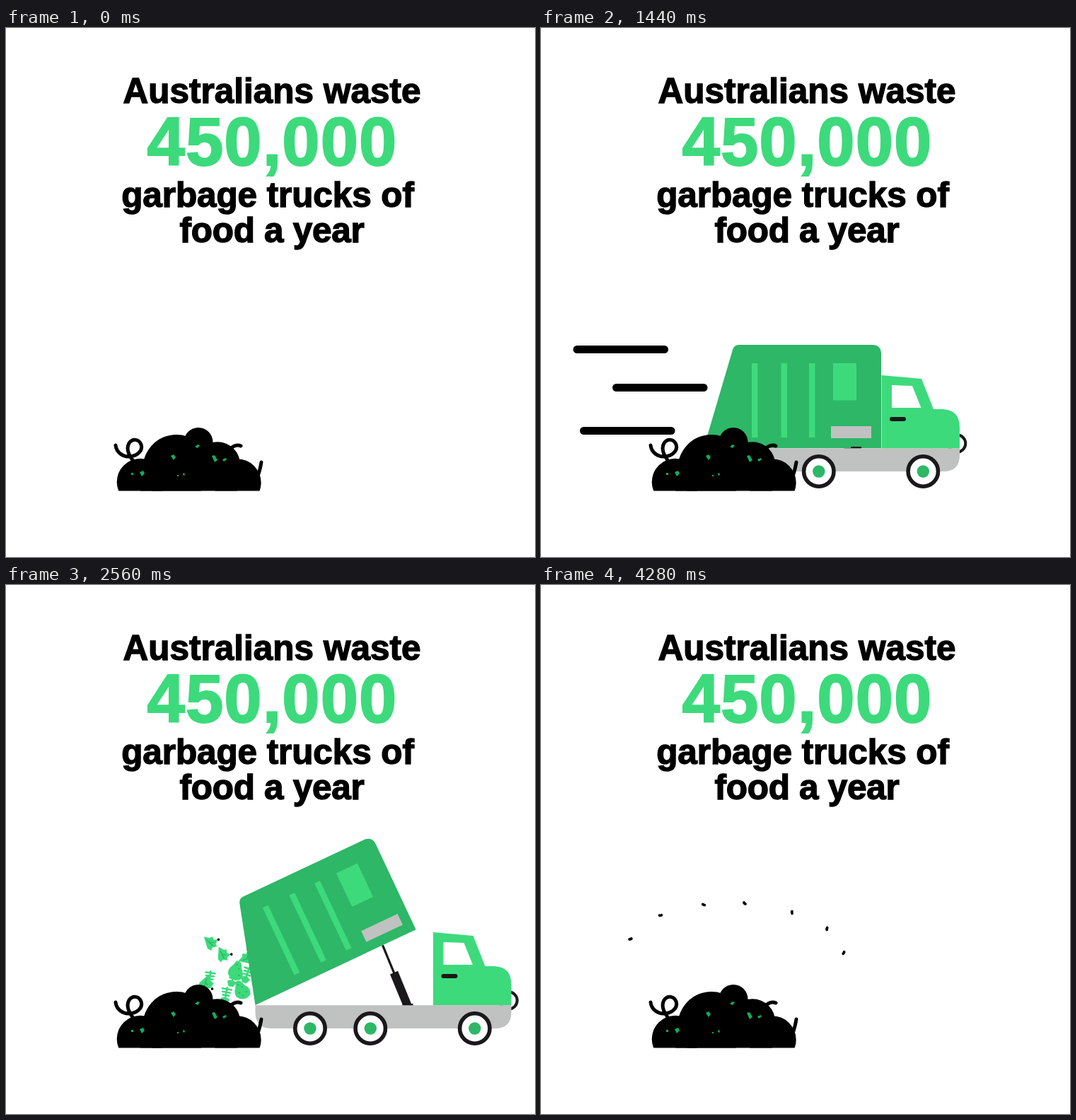
An HTML page that plays this animation: 748 by 748 pixels, repeating every 4.32 s.

```html
<!DOCTYPE html>
<html lang="en">
<head>
<meta charset="utf-8">
<title>Food waste</title>
<style>
  html, body { margin: 0; width: 100%; height: 100%; overflow: hidden; background: #fff; }
  svg { display: block; width: 100vw; height: 100vh; }
  text { font: bold 49.5px "Liberation Sans", Arial, sans-serif; text-anchor: middle; stroke: #000; stroke-width: 1.4; }
  .count { font-size: 96px; letter-spacing: 1px; fill: #3dda7c; stroke: #3dda7c; stroke-width: 2; }
  .light { fill: #3dda7c; }
  .dark { fill: #2db766; }
  .grey { fill: #c0c1c1; }
  .ink { fill: #1a181a; }
  .line { fill: none; stroke: #000; stroke-width: 5; stroke-linecap: round; stroke-linejoin: round; }
  .speck { fill: #12ae5b; }
</style>
</head>
<body>
<svg viewBox="0 0 748 748">
  <defs>
    <clipPath id="frame"><path d="M0 0H737V748H0Z"/></clipPath>
    <clipPath id="ground"><path d="M0 0H748V654.500H0Z"/></clipPath>
    <g id="wheel">
      <circle cy="627" r="21.2" fill="#fff" stroke="#1a181a" stroke-width="5.6"/>
      <circle cy="627" r="8.7" class="dark"/>
    </g>
    <g id="leaf">
      <path class="light" d="M-10-8L-3-7 1-9 3-5 8-6 6 0 8 3 2 5 1 9-4 7Z"/>
      <path d="M-6-4L3 3M-2-1L3-2" stroke="#2db766" stroke-width="1.3"/>
      <circle cx="9" cy="-6" r="1.6"/>
    </g>
    <g id="bone">
      <path d="M0-9V7M-6-7H6M-5-3H5M-4 1H4" fill="none" stroke="#3dda7c" stroke-width="2.4" stroke-linecap="round"/>
      <path class="light" d="M-6 6Q0 1 6 6L3 12-3 12Z"/>
    </g>
    <g id="pear">
      <path class="light" d="M-4-12Q3-14 5-5 12 2 9 9 3 15-5 11-12 7-9-1-6-5-4-12Z"/>
      <path d="M-5 3h2M1-3h2M4 5h2M-2 8h2M-3-7h2" stroke="#2db766" stroke-width="2"/>
    </g>
  </defs>

  <text x="376" y="106">Australians waste</text>
  <text class="count" x="376.500" y="193.500">450,000</text>
  <text x="370" y="252.500" letter-spacing="-.1">garbage trucks of</text>
  <text x="376" y="302.500" letter-spacing="-.3">food a year</text>

  <g clip-path="url(#frame)">
    <g id="speed"></g>
    <g id="food"></g>
    <g id="truck">
      <circle cx="695" cy="587.5" r="12.3" fill="none" stroke="#1a181a" stroke-width="4"/>
      <path id="rod" stroke="#1a181a" stroke-width="3.2"/>
      <path id="piston" stroke="#1a181a" stroke-width="12"/>
      <g id="box">
        <path class="dark" d="M337 594L378 455Q380 448 387 448H575Q588 448 588 461V594Z"/>
        <path class="light" d="M405 474h8.500v105h-8.500zM446.500 474h8.500v105h-8.500zM486 474h8.500v105h-8.500zM520 474h33v52.500h-33z"/>
        <path class="grey" d="M517 563h57v17h-57z"/>
      </g>
      <path class="ink" d="M545 592h15v3h-15z"/>
      <path class="light" d="M588.500 491L645 496 662 539H675Q699 540 699 565V594.500H588.500Z"/>
      <path fill="#fff" d="M603 505L632 506 644.500 537H603Z"/>
      <rect class="ink" x="600" y="550" width="23" height="6" rx="3"/>
      <path class="grey" d="M337 594.300H699V604Q699 627 676 627H360Q337 627 337 604Z"/>
      <use href="#wheel" x="414.500"/><use href="#wheel" x="499.800"/><use href="#wheel" x="647.300"/>
    </g>
  </g>

  <g id="vapour"></g>

  <g clip-path="url(#ground)">
    <circle cx="190" cy="642" r="33.300"/>
    <circle cx="241" cy="622.500" r="47.500"/>
    <circle cx="272" cy="585.500" r="20.500"/>
    <circle cx="299" cy="617.500" r="32.300"/>
    <circle cx="327" cy="643" r="33.700"/>
    <path d="M190 620H327V655H190Z"/>
  </g>
  <path class="line" d="M155 590C156 600 165 606 173 606 186 606 194 597 191 589 188 581 179 580 174 587 170 594 173 603 179 611M317 595C321 592 326 588 332 591M361 614C360 621 358 628 356 634"/>
  <path class="speck" d="M233 605l4-2 3 4-3 4zM267 592l4-3 3 1-3 4zM291 605l4-1 4 7-4 3zM306 610l5-2 1 2-4 3zM189 628l5-2 2 4-4 4zM177 629h3v3h-3zM250 630l2-1 1 3-2 1zM242 632h2v2h-2z"/>
</svg>
<script>
const LOOP = 4320, STEP = 40, REST = 15.5;
const el = id => document.getElementById(id);
const clamp = u => Math.min(1, Math.max(0, u));
const part = (t, from, to) => clamp((t - from) / (to - from));
const smooth = u => u * u * (3 - 2 * u);
const ease = (t, from, to) => smooth(part(t, from, to));
const mix = (a, b, u) => a + (b - a) * u;

function add(parent, tag, attrs) {
  const node = document.createElementNS("http://www.w3.org/2000/svg", tag);
  for (const key in attrs) node.setAttribute(key, attrs[key]);
  return el(parent).appendChild(node);
}
function show(node, on) { node.style.visibility = on ? "visible" : "hidden"; }

// Shows only the stretch of a path between tail and head (0 to 1).
function trim(node, tail, head) {
  show(node, head - tail > 0.005);
  node.setAttribute("stroke-dasharray", `${Math.max(0, head - tail)} 2`);
  node.setAttribute("stroke-dashoffset", -tail);
}

const arrival = [[320, -715], [680, -544], [880, -436], [1120, -280], [1440, -107], [1760, 0], [1920, REST]];
function along(keys, t) {
  const last = keys.length - 1;
  if (t <= keys[0][0]) return keys[0][1];
  if (t >= keys[last][0]) return keys[last][1];
  const i = keys.findIndex(k => k[0] > t) - 1;
  const slope = j => {
    if (j === last) return 0;
    const a = keys[Math.max(0, j - 1)], b = keys[j + 1];
    return (b[1] - a[1]) / (b[0] - a[0]);
  };
  const [t0, x0] = keys[i], [t1, x1] = keys[i + 1];
  const d = t1 - t0, u = (t - t0) / d;
  return mix(x0, x1, smooth(u)) + d * u * (1 - u) * (slope(i) * (1 - u) - slope(i + 1) * u);
}

function drawTruck(t) {
  const x = t < 3320 ? along(arrival, t) : REST + 0.0013 * (t - 3320) ** 2;
  const tilt = 25.2 * (ease(t, 1780, 2140) - ease(t, 3140, 3440));
  el("truck").setAttribute("transform", `translate(${x} 0)`);
  el("box").setAttribute("transform", `rotate(${-tilt} 337 594)`);
  const a = tilt * Math.PI / 180;
  const base = [554, 599], top = [337 + 199 * Math.cos(a), 594 - 199 * Math.sin(a)];
  const reach = Math.hypot(top[0] - base[0], top[1] - base[1]);
  const u = Math.min(1, 55 / reach);
  const joint = base.map((b, i) => mix(b, top[i], u));
  el("rod").setAttribute("d", `M${base}L${top}`);
  el("piston").setAttribute("d", `M${base}L${joint}`);
}

const speedLines = [[51, 454.5], [106.5, 508.5], [60.5, 569.5]].map(([x, y]) =>
  add("speed", "path", { d: `M${x} ${y}h126`, class: "line", pathLength: 1, style: "stroke-width:11" }));
function drawSpeed(t) {
  const tail = ease(t, 1480, 2000), head = ease(t, 1000, 1480);
  speedLines.forEach(line => trim(line, tail, head));
}

// Scraps: where each one is when the pour is at full flow, repeated in three batches.
const FLOW = 2560, BATCH = 420, FALL = 0.0006, DRIFT = 0.2, MOUTH = [354, 542];
const scraps = [
  [290, 507, "leaf", 5], [307, 524, "leaf", 25], [258, 548, "leaf", -5], [288, 556, "bone", 8],
  [326, 545, "pear", 20], [321, 555, "bone", 15], [311, 579, "bone", 10], [341, 550, "bone", 20],
  [282, 564, "leaf", 70], [333, 572, "pear", -20]
];
const pour = [-1, 0, 1].flatMap(batch => scraps.map(([x, y, kind, turn]) => {
  const age = (MOUTH[0] - x) / DRIFT;
  return {
    node: add("food", "use", { href: "#" + kind }),
    start: FLOW + batch * BATCH - age,
    lift: (y - MOUTH[1] - FALL * age * age) / age,
    age, turn
  };
}));
function drawFood(t) {
  for (const { node, start, lift, age, turn } of pour) {
    const now = t - start;
    const x = Math.max(255, MOUTH[0] - DRIFT * now);
    const y = MOUTH[1] + lift * now + FALL * now * now;
    show(node, start > 2080 && now > 0 && y < 601 && t < 3150);
    node.setAttribute("transform", `translate(${x} ${y}) rotate(${turn + (now - age) * 0.12}) scale(1.1)`);
  }
}

// Puffs: place and angle early in the burst, then at its end.
const puffs = [
  [149, 511.5, 8, 126.5, 500.5, -20], [187, 484.5, 25, 169, 467, -8], [237, 476.5, 55, 230, 452, 25],
  [287, 475, 75, 288, 450, 42], [338, 481, -70, 355, 463, 85], [383, 498.5, -48, 404.5, 486, 100],
  [404, 525.5, -32, 428, 520, -60]
].map(place => ({ place, node: add("vapour", "path", { class: "line", style: "stroke-width:3.8" }) }));
const wisps = [
  ["M184 583C182 580 181 577 180 572 180 567 177 562 169 563", -6],
  ["M221 550C220 548 219 545 220 540 221 534 219 530 213 530", -4],
  ["M271 544C271 541 272 538 276 534 279 531 280 527 275 522", 1],
  ["M322 549C323 546 326 543 330 540 334 538 335 533 332 530", 5]
].map(([d, side]) => ({ side, node: add("vapour", "path", { d, class: "line", pathLength: 1, style: "stroke-width:3.8" }) }));

const burst = t => 1 - (1 - part(t, 3200, 4300)) ** 3;
function drawVapour(t) {
  const early = burst(3600), u = (burst(t) - early) / (1 - early);
  for (const { node, place: [x0, y0, a0, x1, y1, a1] } of puffs) {
    show(node, t >= 3320);
    const x = mix(x0, x1, u), y = mix(y0, y1, u);
    const half = mix(4.4, 1.4, clamp(u)) * part(t, 3280, 3480);
    node.setAttribute("d", `M${-half} 0Q0 ${half * 0.4} ${half} 0`);
    node.setAttribute("transform", `translate(${x} ${y}) rotate(${mix(a0, a1, clamp(u))})`);
  }
  for (const { node, side } of wisps) {
    trim(node, ease(t, 3640, 3960), ease(t, 3400, 3600));
    const rise = (t - 3600) * 0.05;
    node.setAttribute("transform", `translate(${side * rise / 12} ${-rise})`);
  }
}

function draw(now) {
  const t = Math.floor((now % LOOP) / STEP) * STEP;
  drawTruck(t);
  drawSpeed(t);
  drawFood(t);
  drawVapour(t);
}
const begin = performance.now();
function tick() {
  draw(performance.now() - begin);
  requestAnimationFrame(tick);
}
tick();
</script>
</body>
</html>
```
